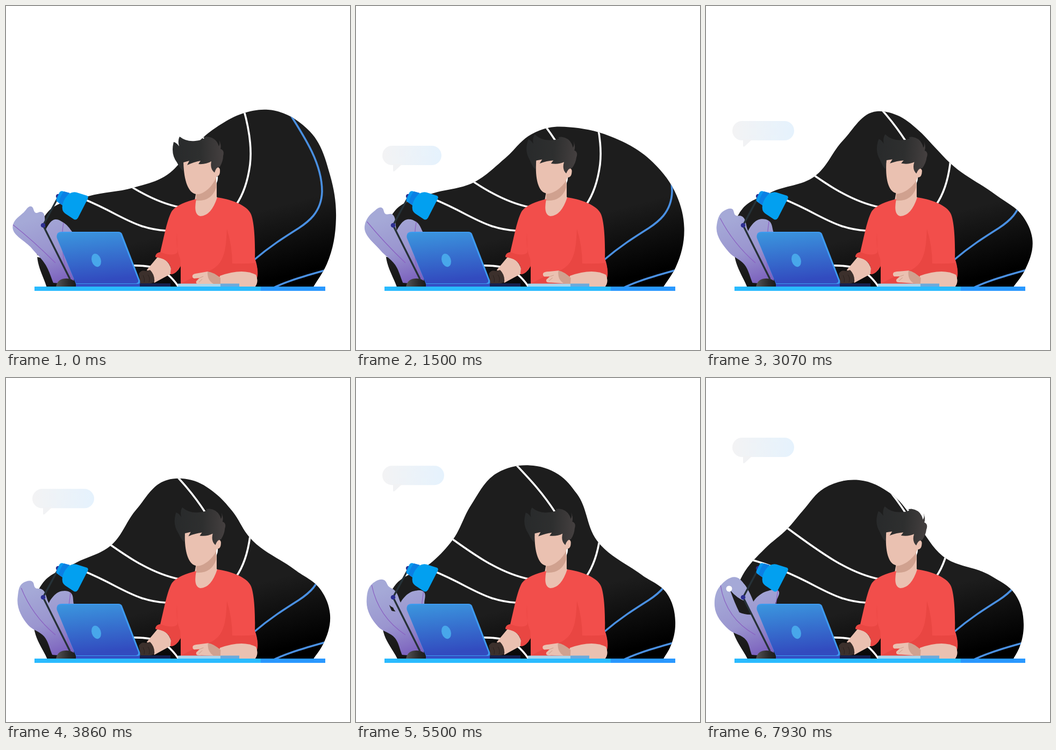
These frames come from a looping animation (640x640 px, 8 s). An HTML page:

```html
<!DOCTYPE html>
<html lang="en">
<head>
<meta charset="utf-8">
<title>At the desk</title>
<style>
  html, body { margin: 0; width: 100%; height: 100%; overflow: hidden; background: #fff; }
  svg { display: block; width: 100vw; height: 100vh; }
</style>
</head>
<body>
<svg viewBox="0 0 640 640">
  <defs>
    <linearGradient id="night" gradientUnits="userSpaceOnUse" x1="468" y1="382" x2="500" y2="508">
      <stop stop-color="#1d1d1d"/><stop offset="1" stop-color="#000"/>
    </linearGradient>
    <linearGradient id="leaf" gradientUnits="userSpaceOnUse" x1="50" y1="395" x2="95" y2="520">
      <stop stop-color="#a5a9d7"/><stop offset=".5" stop-color="#9a95cf"/><stop offset="1" stop-color="#7a5fbd"/>
    </linearGradient>
    <linearGradient id="lid" x1="0" y1="0" x2=".15" y2="1">
      <stop stop-color="#3b96de"/><stop offset="1" stop-color="#324bbf"/>
    </linearGradient>
    <linearGradient id="base"><stop stop-color="#555"/><stop offset=".6" stop-color="#2b2b2b"/><stop offset="1" stop-color="#1a1a1a"/></linearGradient>
    <linearGradient id="hair"><stop stop-color="#282a2b"/><stop offset=".55" stop-color="#2e2f2f"/><stop offset="1" stop-color="#454040"/></linearGradient>
    <linearGradient id="chat"><stop stop-color="#f3f3f4"/><stop offset="1" stop-color="#e5f2fd"/></linearGradient>
    <clipPath id="inside"><path id="blobClip"/></clipPath>
  </defs>

  <path id="blob" fill="url(#night)"/>
  <g clip-path="url(#inside)" fill="none" stroke="#fff" stroke-width="3.6">
    <path d="M80 337C130 350 175 372 205 388C240 406 262 416 298 418"/>
    <path d="M140 271C200 315 260 362 322 374"/>
    <path d="M288 151C320 185 345 210 372 252"/>
    <path d="M440 185C452 225 458 260 454 295C450 325 442 350 428 370"/>
    <path d="M232 483C262 482 285 487 298 497Q312 508 322 524"/>
    <path d="M48 463L76 469"/>
    <g stroke="#4a90e2">
      <path d="M520 188C560 250 588 295 588 345C587 385 560 403 545 413C515 432 490 448 462 472"/>
      <path d="M498 524C525 511 560 501 600 490"/>
    </g>
  </g>

  <g id="bubble" fill="url(#chat)">
    <rect id="pill" x="49" width="115" height="36" rx="18"/>
    <path d="M69 34V46Q69 49 72 47L86 34Z" fill="#f1f2f4"/>
  </g>

  <g fill="url(#leaf)">
    <path id="leafA"/>
    <path id="gap" d="M45 395Q58 410 72 415Q78 432 88 440Q72 441 62 436Q53 418 45 395Z" fill="#1d1d1d"/>
    <circle id="notch" cx="43" cy="392" fill="#fff"/>
    <path id="leafB"/>
  </g>
  <g fill="none" stroke="#8a60c2" stroke-width="1.2"><path id="veinA"/><path id="veinB"/></g>

  <g id="lamp">
    <path d="M93 523Q95 507 112 507Q130 507 131 523Z" fill="url(#base)"/>
    <circle cx="97" cy="354" r="4.2" fill="#2d2f90"/>
    <path d="M98 354L69 408L119 508" fill="none" stroke="#263238" stroke-width="3.4"/>
    <circle cx="69" cy="408" r="4.3" fill="#2d2f90"/>
    <path d="M100 346Q103 343 107 345L118 348L105 371L95 364Q92 361 95 356Z" fill="#0798ee"/>
    <path d="M108 345L119 348Q108 358 106 371L98 366Q101 352 108 345Z" fill="#0a80e4"/>
    <path d="M118 349Q126 344 135 348L151 353Q154 355 152 359L134 394Q130 400 125 396L110 386Q103 381 105 370Q108 357 118 349Z" fill="#02a0f0"/>
  </g>

  <g id="person">
    <path d="M282 467Q305 470 309 497L276 515L262 491Z" fill="#eac1b1"/>
    <path d="M247 498Q252 490 260 493L268 491Q277 500 276 513Q272 518 250 516Z" fill="#3c302c"/>
    <path d="M255 501Q259 508 257 514M264 500Q269 507 266 514" fill="none" stroke="#2a211e"/>
    <path d="M354 345L392 314V355L397 362Q385 393 362 393Q345 390 352 356Z" fill="#eac1b1"/>
    <path d="M354 350Q378 347 391 318V338Q382 364 354 362Z" fill="#d0a18f"/>
    <path d="M394 316Q395 324 391 331V319Z" fill="#fff"/>
    <path d="M354 359C335 364 318 370 309 381C300 395 294 430 287 458Q278 460 278 467Q303 470 307 488L306 499Q316 500 325 482V517H398L410 503Q440 492 467 507Q470 488 463 470C464 440 462 395 454 384C445 369 415 359 393 356Q382 390 362 391Q348 389 354 359Z" fill="#f24e4b"/>
    <g fill="#e94642">
      <path d="M318 423Q316 452 324 470L325 484Q316 500 306 499L307 488Q303 470 278 467Q278 459 287 458Q312 467 319 458Z"/>
      <path d="M411 415C409 455 407 484 372 495Q345 505 325 517H398L421 482Q421 445 411 415Z"/>
      <path d="M421 479Q445 480 464 478L467 486Q470 500 466 507Q440 490 400 503Q414 493 421 479Z"/>
    </g>
    <path d="M398 502Q440 487 465 500Q471 514 463 523H395Z" fill="#eac1b1"/>
    <path d="M320 516.500H399V522H320Z" fill="#a8d6ed"/>
    <path d="M399 516.500H434V522H399Z" fill="#6baadc"/>
    <g id="hand">
      <path d="M347 501Q348 498 358 497L375 494L399 505V517H363Q352 519 354 512L360 506L350 507Q346 506 347 501Z" fill="#eac1b1"/>
      <path d="M375 494Q386 495 399 506V517H386Q374 510 375 494Z" fill="#d0a18f"/>
      <path d="M360 506L367 503M359 514L365 508" stroke="#d0a18f"/>
    </g>
    <g id="head">
      <path d="M330 284C330 322 338 344 350 349Q357 352 365 348C378 342 389 327 391 317Q399 317 398 304Q396 297 388 302L384 280Z" fill="#eac1b1"/>
      <path d="M312 253Q317 254 322 261Q319 250 323 243Q336 253 352 251Q364 250 369 246L367 244L373 243Q391 244 396 261Q399 256 396 249Q401 258 399 266Q407 268 404 279Q404 288 398 299Q391 299 388 310Q379 303 382 289Q372 295 358 294L362 288Q350 290 337 296L341 288L330 291V307Q326 306 318 291Q306 275 312 253Z" fill="url(#hair)"/>
    </g>
  </g>

  <path d="M130 515H250V523H130Z" fill="#3350c4"/>
  <path d="M249 516H306V523H249Z" fill="#16204e"/>
  <path d="M104 420H209Q214 420 216 424L249 510Q251 517 245 517H130L95 432Q92 420 104 420Z" fill="#3d9af0"/>
  <path d="M103 422H208Q212 422 213 425L246 510Q247 515 242 516H130L95 432Q93 422 103 422Z" fill="url(#lid)"/>
  <ellipse cx="168" cy="473" rx="8.500" ry="12.500" transform="rotate(-18 168 473)" fill="#48a7ea"/>
  <path d="M53 522H474V530H53Z" fill="#2abbff"/>
  <path d="M474 522H594V530H474Z" fill="#2998ff"/>
</svg>

<script>
const LOOP = 8000;
const set = (id, name, value) => document.getElementById(id).setAttribute(name, value);
const lerp = (a, b, k) => a + (b - a) * k;
const mix = (p, q, k) => p.map((a, i) => [lerp(a[0], q[i][0], k), lerp(a[1], q[i][1], k)]);
const progress = (t, from, length) => Math.min(1, Math.max(0, (t - from) / length));
const ease = k => (1 - Math.cos(Math.PI * k)) / 2;
const points = text => text.split(', ').map(pair => pair.split(' ').map(Number));

// Every point travels in a straight line at constant speed from pose to pose.
const glide = (poses, times, t) => poses.slice(1).reduce(
  (p, next, i) => mix(p, next, progress(t, times[i], times[i + 1] - times[i])), poses[0]);

// Smooth curve whose tangent at each point follows the circle through its neighbours.
function curve(p) {
  const last = p.length - 1;
  const dist = (a, b) => Math.hypot(b[0] - a[0], b[1] - a[1]) || 0.01;
  const dirs = p.map((c, i) => {
    const a = p[Math.max(0, i - 1)], b = p[Math.min(last, i + 1)];
    const r = i > 0 && i < last ? dist(c, b) / dist(a, c) : 1;
    const v = [0, 1].map(j => (c[j] - a[j]) * r + (b[j] - c[j]) / r);
    const len = Math.hypot(v[0], v[1]) || 1;
    return v.map(x => x / len);
  });
  let d = `M${p[0]}`;
  for (let i = 0; i < last; i++) {
    const h = dist(p[i], p[i + 1]) * 0.35;
    const c1 = p[i].map((x, j) => x + dirs[i][j] * h);
    const c2 = p[i + 1].map((x, j) => x - dirs[i + 1][j] * h);
    d += `C${c1} ${c2} ${p[i + 1]}`;
  }
  return d + 'Z';
}

const hill = [
  '78 383, 153 354, 237 338, 300 314, 335 279, 362 249, 400 220, 440 200, 488 193, 565 233, 603 315, 614 395',
  '68 377, 120 347, 202 317, 255 250, 318 196, 355 203, 395 231, 425 262, 455 293, 540 352, 590 392, 607 432',
  '72 390, 148 340, 175 297, 204 234, 250 172, 315 153, 372 167, 408 205, 447 305, 530 370, 575 402, 591 458',
  '68 367, 110 317, 152 280, 180 247, 220 205, 285 190, 345 216, 395 275, 440 331, 530 368, 575 402, 591 458'
].map(points);

const leafA = [
  '88 515, 74 482, 48 451, 13 407, 33 384, 47 373, 56 385, 64 383, 74 418',
  '86 515, 71 481, 41 460, 22 408, 32 381, 49 379, 55 391, 66 393, 79 417',
  '85 515, 75 488, 42 468, 16 425, 27 386, 58 371, 72 384, 80 397, 90 420'
].map(points);

const leafB = [
  '82 465, 76 412, 92 397, 107 403, 123 420',
  '86 470, 92 411, 116 396, 134 395, 129 420'
].map(points);

function drawHill(t) {
  const p = glide(hill, [0, 3070, 6070, 7930], t);
  const [x, y] = p[p.length - 1];
  const drift = progress(t, 0, 6000);
  const d = curve([
    [76 + 2 * drift, 524], [58 - 9 * drift, 466], ...p,
    [lerp(x, 571, 0.4), lerp(y, 524, 0.66)], [571, 524]
  ]);
  set('blob', 'd', d);
  set('blobClip', 'd', d);
}

function drawPlant(t) {
  const a = glide(leafA, [0, LOOP / 2, LOOP], t);
  const b = glide(leafB, [0, LOOP], t);
  set('leafA', 'd', curve([...a, [122, 518]]));
  set('leafB', 'd', curve([[98, 519], ...b, [126, 519]]));
  set('gap', 'transform', `translate(68 432) scale(${progress(t, 4600, 3300)}) translate(-68 -432)`);
  set('notch', 'r', 5.5 * progress(t, 6790, 1100));
  const k = progress(t, 0, 6000);
  const [x, y] = mix([a[3]], [a[4]], k)[0];
  set('veinA', 'd', `M${x} ${y}Q${x + lerp(38, 10, k)} ${y + lerp(30, 62, k)} 92 478`);
  set('veinB', 'd', `M${b[3]}Q${b[3][0] - 8} 450 116 508`);
}

function drawBubble(t) {
  const pop = 1 - (1 - progress(t, 900, 1000)) ** 3;
  const rise = (height, from, length) => height * ease(progress(t, from, length));
  const y = 260 - rise(46, 1550, 1200) - rise(57, 3145, 3000) - rise(46, 6860, 800);
  set('pill', 'width', lerp(36, 115, pop));
  set('bubble', 'transform', `translate(0 ${y})`);
  set('bubble', 'opacity', progress(t, 900, 400));
}

function drawPerson(t) {
  const tilt = 6.8 * Math.abs(Math.sin(Math.PI * t / 4720)) ** 1.5;
  set('head', 'transform', `rotate(${tilt} 372 345)`);
  set('hand', 'transform', `rotate(${tilt * 0.8} 398 515)`);
}

const start = performance.now();
function frame() {
  const t = (performance.now() - start) % LOOP;
  for (const draw of [drawHill, drawPlant, drawBubble, drawPerson]) draw(t);
  requestAnimationFrame(frame);
}
frame();
</script>
</body>
</html>
```
